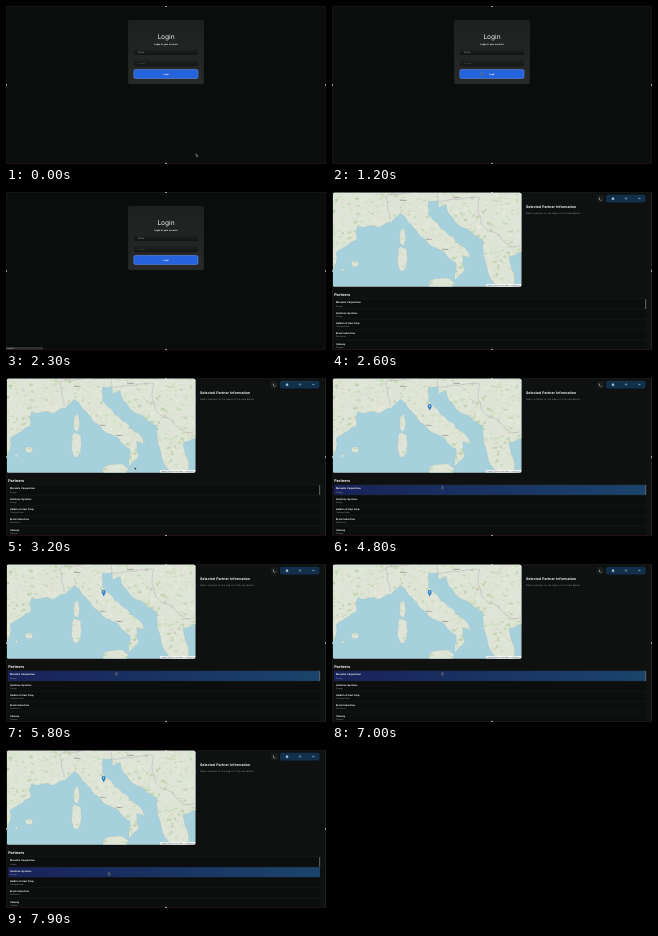
Write an HTML page that moves like this. It is 320x158 px and loops after 8000 ms.

```html
<!DOCTYPE html>
<html lang="en">
<head>
<meta charset="utf-8">
<title>Partner map</title>
<style>
html, body { margin: 0; width: 100%; height: 100%; overflow: hidden; background: #0b0d0c; }
svg { display: block; width: 100vw; height: 100vh; }
text { font-family: Inter, "Liberation Sans", sans-serif; fill: #f2f4f4; text-rendering: geometricPrecision; }
.bold { font-weight: 700; }
.dim { fill: #8c9293; }
.place { fill: #555; text-anchor: middle; }
.mid { text-anchor: middle; }
</style>
</head>
<body>
<svg viewBox="0 0 320 158" preserveAspectRatio="none">
  <defs>
    <linearGradient id="field" x1="0" y1="0" x2="0" y2="1">
      <stop offset="0" stop-color="#222525"/><stop offset="1" stop-color="#131515"/>
    </linearGradient>
    <linearGradient id="card" x1="0" y1="0" x2="0" y2="1">
      <stop offset="0" stop-color="#1d201f"/><stop offset="1" stop-color="#272a29"/>
    </linearGradient>
    <linearGradient id="glow">
      <stop offset="0" stop-color="#19225a"/><stop offset="1" stop-color="#1a446c"/>
    </linearGradient>
    <clipPath id="frame"><rect x="1" y=".7" width="188.3" height="93.8" rx="1.6"/></clipPath>
    <clipPath id="coast"><path id="coastPath"/></clipPath>
  </defs>

  <rect width="320" height="158" fill="#0b0d0c"/>

  <g id="login">
    <rect x="122.4" y="14.4" width="75.2" height="63.4" rx="1.6" fill="url(#card)" stroke="#303433" stroke-width=".4"/>
    <text class="mid" x="160" y="32.5" font-size="6.6">Login</text>
    <text class="mid bold" x="160" y="38.8" font-size="2.15" word-spacing=".2">Login to your account</text>
    <rect x="128" y="42" width="64" height="7" rx="1.2" fill="url(#field)"/>
    <rect x="128" y="53.2" width="64" height="7" rx="1.2" fill="url(#field)"/>
    <text class="dim" x="132" y="46.5" font-size="2.3">Name</text>
    <text class="dim" x="132" y="57.8" font-size="2.2">••••••</text>
    <rect x="127.8" y="63.5" width="64.2" height="9" rx="1.7" fill="#2463dc" stroke="#6a9af0" stroke-width=".5"/>
    <text class="mid bold" x="160" y="68.8" font-size="2.1">Login</text>
    <g id="status">
      <rect y="155" width="37" height="3" fill="#303335"/>
      <text x=".6" y="157.2" font-size="1.7">localhost</text>
    </g>
  </g>

  <g id="board">
    <rect width="320" height="158" fill="#0e1110"/>
    <g clip-path="url(#frame)">
      <rect width="190" height="95" fill="#d5d8d8"/>
      <g id="map"><rect width="190" height="95" fill="#a6d0dc"/></g>
      <g id="pin">
        <path d="M97.7 32.3C97.2 30.5 95.8 29.4 95.8 27.9A1.9 1.9 0 0 1 99.6 27.9C99.6 29.4 98.2 30.5 97.7 32.3Z" fill="#2a81cb" stroke="#1d689f" stroke-width=".25"/>
        <circle cx="97.7" cy="27.9" r=".6" fill="#fff"/>
      </g>
      <rect x="154" y="92" width="36" height="3" fill="#fff" opacity=".8"/>
      <text x="155" y="94" font-size="1.75" style="fill:#444">Leaflet | © OpenStreetMap contributors</text>
    </g>
    <text class="bold" x="194" y="16" font-size="3.5" word-spacing=".4">Selected Partner Information</text>
    <text class="dim" x="194" y="21.8" font-size="2.25" word-spacing=".2">Select a partner on the map or list to view details.</text>
    <rect x="264.8" y="3" width="7.2" height="7.4" rx="1.5" fill="#191c1c"/>
    <path d="M268 5.3A1.6 1.6 0 1 0 270 7.6A1.5 1.5 0 0 1 268 5.3" fill="#ccd2d4"/>
    <rect x="274" y="2.7" width="39.5" height="7.8" rx="1.7" fill="#12304c"/>
    <g fill="none" stroke="#a8c6dc" stroke-width=".5">
      <path d="M280 7.6V6.3L281 5.4L282 6.3V7.6Z" fill="#a8c6dc"/>
      <circle cx="294" cy="6.5" r=".8"/>
      <path d="M306.2 6.5H308M307.3 5.7L308.1 6.5L307.3 7.3"/>
    </g>
    <text class="bold" x="2.2" y="103.8" font-size="3.8">Partners</text>
    <g id="rows"></g>
    <rect x="313.1" y="107" width="1.1" height="10" rx=".5" fill="#5d6263"/>
    <path d="M319.4 0V158" stroke="#2c3031" stroke-width=".6"/>
  </g>

  <path d="M0 157.6H320" stroke="#2b1315" stroke-width=".7"/>
  <path d="M.2 157V.2H319.8V157" fill="none" stroke="#2a2d2d" stroke-width=".4"/>
  <path d="M159 .4H161M159 157.4H161M.4 78V80M319.6 78V80" stroke="#c8cccc" stroke-width=".8"/>

  <path id="arrow" d="M0 0V2.9L.7 2.3L1.2 3.4L1.7 3.2L1.2 2.1H2.1Z" fill="#111" stroke="#e8e8e8" stroke-width=".3"/>
  <path id="hand" d="M-.3 0H.3V1L1.3 1.4V2.2L.9 2.9H-.4L-1 1.9L-.3 2Z" fill="#222" stroke="#d8dcdc" stroke-width=".25"/>
</svg>
<script>
const $ = id => document.getElementById(id);
const LOOP = 8000, DEG = 7.8;

function add(parent, tag, attrs, text) {
  const el = document.createElementNS("http://www.w3.org/2000/svg", tag);
  for (const key in attrs) el.setAttribute(key, attrs[key]);
  if (text) el.textContent = text;
  parent.appendChild(el);
  return el;
}

let seed = 17;
const rnd = () => (seed = seed * 16807 % 2147483647) / 2147483647;
const spread = size => (rnd() - .5) * size;

// Web Mercator, centred on 12.5 E, 42 N
const merc = lat => Math.log(Math.tan(Math.PI / 4 + lat * Math.PI / 360)) * 180 / Math.PI;
const project = ([lon, lat]) => [97 + (lon - 12.5) * DEG, 47 - (merc(lat) - merc(42)) * DEG];

// Midpoint displacement: splits a line into small random bends
function rough([ax, ay], [bx, by], depth = 3) {
  if (!depth) return [[bx, by]];
  const push = spread(.22);
  const mid = [(ax + bx) / 2 + (by - ay) * push, (ay + by) / 2 - (bx - ax) * push];
  return [...rough([ax, ay], mid, depth - 1), ...rough(mid, [bx, by], depth - 1)];
}

function trace(points) {
  const p = points.map(project);
  return path([p[0], ...p.slice(1).flatMap((q, i) => rough(p[i], q))]);
}

const path = points => "M" + points.map(([x, y]) => `${x.toFixed(2)} ${y.toFixed(2)}`).join("L");

function island(lon, lat, rx, ry) {
  const [x, y] = project([lon, lat]), side = v => Math.sign(v) * Math.abs(v) ** .8;
  return path(Array.from({ length: 18 }, (_, i) => {
    const a = i / 18 * 2 * Math.PI, k = 1 + spread(.25);
    return [x + side(Math.cos(a)) * rx * k, y + side(Math.sin(a)) * ry * k];
  })) + "Z";
}

// key points only; the bends between them are random
const iberiaToToe = [[0, 38.7], [.6, 40.7], [3.2, 41.9], [3.3, 43.2], [6.2, 43.1], [8.8, 44.4],
  [10.4, 43.2], [12.3, 41.7], [14.5, 40.7], [16, 39.6], [15.8, 37.9]];
const toeToIstria = [[17.1, 39], [16.8, 40.4], [18.4, 39.9], [16, 41.7], [13.6, 43.5], [12.4, 44.3],
  [12.4, 45.5], [13.6, 45.6], [13.7, 44.9]];
const balkans = [[14.7, 45.2], [16, 43.5], [19.4, 41.9], [19.5, 40.4], [21.5, 37], [23.4, 37],
  [22.8, 40.3], [28, 40.8]];

function buildMap() {
  const map = $("map");
  const mainland = trace([...iberiaToToe, ...toeToIstria, ...balkans]) + "V-20H-20V78Z";
  const shape = mainland
    + island(9.1, 40.1, 5, 11.5) + island(9.1, 42.2, 3, 8)
    + island(14.1, 37.4, 12, 7.5) + island(3, 39.6, 3.8, 2.8) + island(1.4, 39, 1.5, 1.1);
  $("coastPath").setAttribute("d", shape);
  add(map, "path", { d: shape, fill: "#dfe5d6" });
  const land = add(map, "g", { "clip-path": "url(#coast)" });
  const tones = ["#b9d4a6", "#c9dcba", "#eceae2", "#acc99a", "#d9dcd2"];
  for (let i = 0; i < 800; i++)
    add(land, "ellipse", { cx: rnd() * 190, cy: rnd() * 95, rx: .4 + rnd() * 2, ry: .3 + rnd() * 1.4,
      fill: tones[i % tones.length], opacity: .55 });
  for (let i = 0; i < 130; i++) {
    const a = [rnd() * 190, rnd() * 95], b = [a[0] + spread(16), a[1] + spread(16)];
    add(land, "path", { d: path([a, ...rough(a, b)]), fill: "none",
      stroke: i % 3 ? "#dba89c" : "#b9b7b4", "stroke-width": .22, opacity: .8 });
  }
  for (const b of [[[7.5, 43.8], [7, 46], [13.6, 46.5], [13.7, 45.6]],
    [[13.6, 45.5], [19, 45.8], [19.3, 43.3], [23, 41.3], [28, 41.5]]])
    add(land, "path", { d: trace(b), fill: "none", stroke: "#a98fb0", "stroke-width": .35 });
  add(map, "path", { d: shape, fill: "none", stroke: "#93b5b6", "stroke-width": .25 });
  for (const [name, ...at] of [["Roma", 12.5, 41.9], ["Milano", 9.2, 45.5], ["Zagreb", 16, 45.8], ["Napoli", 14.6, 40.9]]) {
    const [x, y] = project(at);
    add(map, "text", { x, y, class: "place", "font-size": 2 }, name);
  }
}

const partners = [["Morvella Corporation", "Energy"], ["Quillorne Systems", "Energy"],
  ["Haldrin-Ostavi Corp", "Transportation"], ["Brask Industries", "Electronics"], ["Velnorq", "Finance"]];
const ROW = 10.3, TOP = 106.8;

const glows = partners.map(([name, field], i) => {
  const y = TOP + i * ROW, rows = $("rows");
  add(rows, "rect", { x: 2, y, width: 312, height: ROW, fill: "#0c0e0e" });
  const glow = add(rows, "rect", { x: 2, y, width: 312, height: ROW, fill: "url(#glow)", opacity: 0 });
  add(rows, "path", { d: `M2 ${y}H314`, stroke: "#262a2b", "stroke-width": .3 });
  add(rows, "text", { x: 4, y: y + 4.6, class: "bold", "font-size": 2.4, "word-spacing": .2 }, name);
  add(rows, "text", { x: 4, y: y + 7.7, class: "dim", "font-size": 2 }, field);
  return glow;
});

const ramp = (t, a, b) => Math.min(1, Math.max(0, (t - a) / (b - a)));
const ease = p => p * p * (3 - 2 * p);
const show = (id, on) => $(id).setAttribute("visibility", on ? "visible" : "hidden");

// each pointer move: start, end, dx, dy
const moves = [[700, 1200, -40, -81], [2650, 3700, -39.7, 41.8], [7200, 7600, -7.3, 14]];

function cursorAt(t) {
  return moves.reduce(([x, y], [a, b, dx, dy]) => {
    const p = ease(ramp(t, a, b));
    return [x + dx * p, y + dy * p];
  }, [190, 147.5]);
}

function draw(t) {
  const inside = t >= 2400;
  $("login").style.display = inside ? "none" : "";
  $("board").style.display = inside ? "" : "none";
  show("status", t >= 1700 && !inside);
  $("map").setAttribute("opacity", ramp(t, 2400, 2600));
  show("pin", t >= 4400);
  glows[0].setAttribute("opacity", ramp(t, 3600, 4000) * (1 - ramp(t, 7400, 7700)));
  glows[1].setAttribute("opacity", ramp(t, 7400, 7800));

  const [x, y] = cursorAt(t);
  const pointing = (t >= 1150 && t < 1500) || t >= 3600;
  const hidden = t >= 1500 && t < 2650;
  for (const id of ["arrow", "hand"]) {
    $(id).setAttribute("transform", `translate(${x} ${y})`);
    show(id, !hidden && pointing === (id === "hand"));
  }
}

buildMap();
const start = performance.now();
function tick() {
  draw((performance.now() - start) % LOOP);
  requestAnimationFrame(tick);
}
tick();
</script>
</body>
</html>
```
